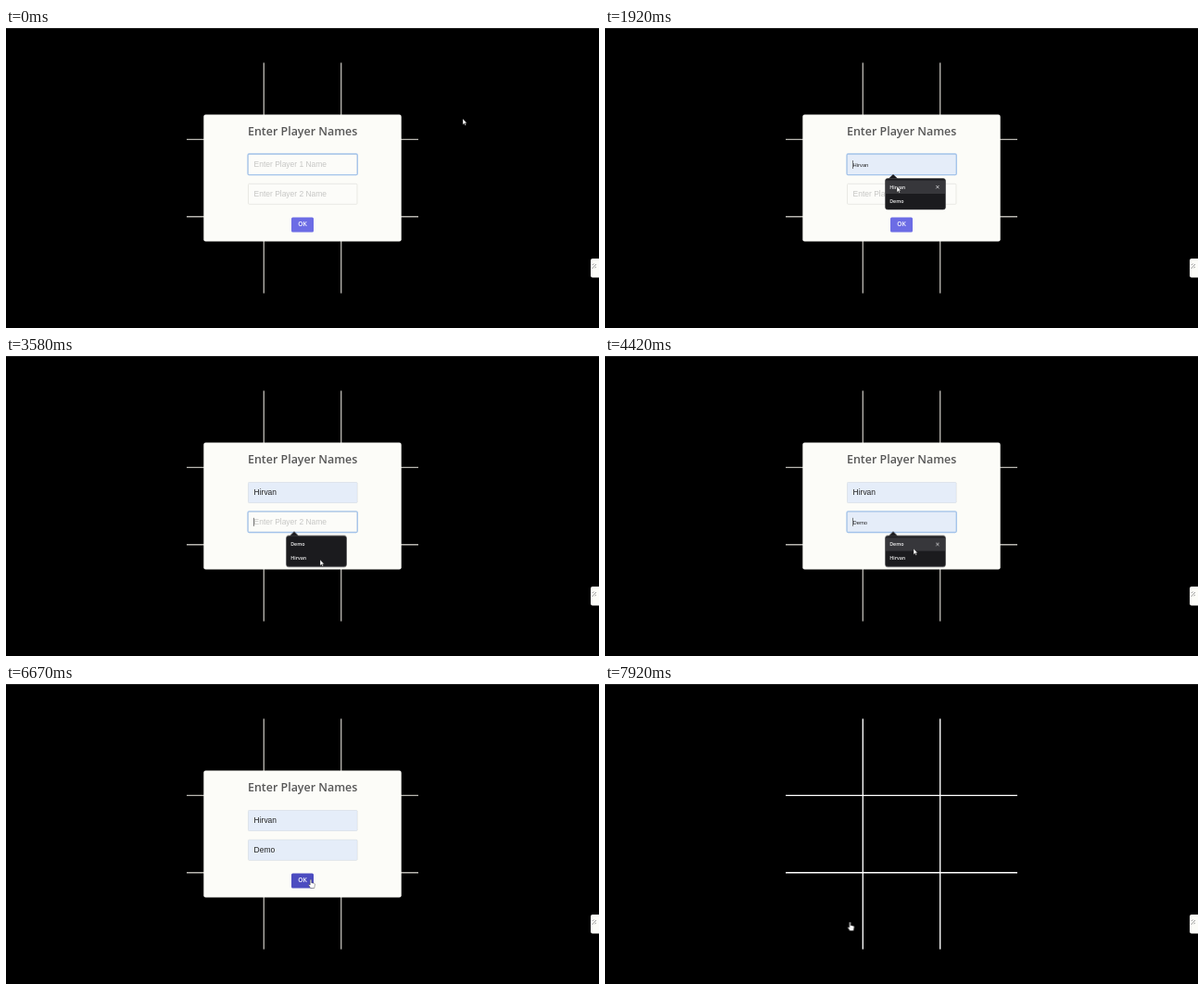
These frames come from a looping animation (640 by 324 pixels, 8000 ms). An HTML page:

```html
<!DOCTYPE html>
<html lang="en">
<head>
<meta charset="utf-8">
<title>Tic-tac-toe</title>
<style>
html, body { margin: 0; width: 100%; height: 100%; overflow: hidden; background: #000; }
svg { display: block; width: 100%; height: 100%; }
text { font-family: Arial, "Liberation Sans", sans-serif; font-size: 8.46px; fill: #222; }
.title { font: 600 12.45px "Open Sans", sans-serif; fill: #575757; text-anchor: middle; }
.ok { font: 600 6.7px "Open Sans", sans-serif; fill: #fff; text-anchor: middle; }
.option { font: 600 5.3px "Open Sans", sans-serif; fill: #f4f4f4; }
.preview { font-size: 5.8px; }
.hint { fill: #c6c6c4; }
.panel { fill: #fcfcf8; }
.field { fill: #fcfcf9; stroke: #e1e1dc; stroke-width: .7; }
.filled { fill: #e5edf9; stroke: #d5dce8; stroke-width: .5; }
.ring { fill: none; stroke: #a3c3ea; stroke-width: 1.3; }
.caret { stroke: #333; stroke-width: .7; }

/* Hard switches and fades share one 8 s clock. */
.cut { animation: 8s step-end infinite; }
.fade { animation: 8s linear infinite; }
.dialog { animation-name: dialog; }
.toast { animation-name: toast; }
.dim { animation-name: dim; }
.focus1 { animation-name: focus1; }
.focus2 { animation-name: focus2; }
.hint1 { animation-name: hint1; }
.hint2 { animation-name: hint2; }
.fill1 { animation-name: fill1; }
.fill2 { animation-name: fill2; }
.peek1 { animation-name: peek1; }
.peek2 { animation-name: peek2; }
.hover2 { animation-name: hover2; }
.value1 { animation-name: value1; }
.value2 { animation-name: value2; }
.caret1 { animation-name: caret1; }
.caret2 { animation-name: caret2; }
.menu1 { animation-name: menu1; }
.menu2 { animation-name: menu2; }
.press { animation-name: press; }
.arrow { animation-name: arrow; }
.beam { animation-name: beam; }
.hand { animation-name: hand; }
.pointer { animation: move 8s ease-in-out infinite; }

@keyframes dialog { 0%, 83.7% { opacity: 1 } 84.6%, 100% { opacity: 0 } }
@keyframes toast { 0%, 84.4% { opacity: 0 } 85.6%, 96% { opacity: 1 } 97.8%, 100% { opacity: 0 } }
@keyframes dim { 0%, 96% { stroke: #b8b6b0 } 97.8%, 100% { stroke: #fff } }
@keyframes focus1 { 0% { opacity: 1 } 36.25%, 100% { opacity: 0 } }
@keyframes focus2 { 0% { opacity: 0 } 36.25% { opacity: 1 } 72%, 100% { opacity: 0 } }
@keyframes hint1 { 0% { opacity: 1 } 22.4%, 100% { opacity: 0 } }
@keyframes hint2 { 0% { opacity: 1 } 53.75%, 100% { opacity: 0 } }
@keyframes fill1 { 0% { opacity: 0 } 22.4%, 100% { opacity: 1 } }
@keyframes fill2 { 0% { opacity: 0 } 53.75%, 100% { opacity: 1 } }
@keyframes peek1 { 0% { opacity: 0 } 22.4% { opacity: 1 } 27%, 100% { opacity: 0 } }
@keyframes peek2 { 0% { opacity: 0 } 53.75% { opacity: 1 } 62.5%, 100% { opacity: 0 } }
@keyframes hover2 { 0% { opacity: 0 } 53.75%, 100% { opacity: 1 } }
@keyframes value1 { 0% { opacity: 0 } 27%, 100% { opacity: 1 } }
@keyframes value2 { 0% { opacity: 0 } 62.5%, 100% { opacity: 1 } }
@keyframes caret1 { 0% { opacity: 0 } 16.25% { opacity: 1 } 27%, 100% { opacity: 0 } }
@keyframes caret2 {
  0% { opacity: 0 } 40.6% { opacity: 1 }
  62.5% { opacity: 1; transform: translateX(23.3px) } 72%, 100% { opacity: 0 }
}
@keyframes menu1 { 0%, 16.2% { opacity: 0 } 16.3%, 27% { opacity: 1 } 28.5%, 100% { opacity: 0 } }
@keyframes menu2 { 0%, 40.5% { opacity: 0 } 40.6%, 64% { opacity: 1 } 66%, 100% { opacity: 0 } }
@keyframes press { 0% { fill: #6c6ce5 } 78%, 100% { fill: #4c4cc0 } }
@keyframes arrow {
  0% { opacity: 1 } 13% { opacity: 0 } 20.5% { opacity: 1 } 31.5% { opacity: 0 }
  42% { opacity: 1 } 72% { opacity: 0 } 84.4% { opacity: 1 } 96.5%, 100% { opacity: 0 }
}
@keyframes beam {
  0% { opacity: 0 } 13% { opacity: 1 } 20.5% { opacity: 0 } 31.5% { opacity: 1 } 42%, 100% { opacity: 0 }
}
@keyframes hand { 0% { opacity: 0 } 72% { opacity: 1 } 84.4% { opacity: 0 } 96.5%, 100% { opacity: 1 } }
@keyframes move {
  0%, 4% { transform: translate(493px, 98px) }
  13.5%, 19% { transform: translate(320px, 149px) }
  22.4%, 28% { transform: translate(315px, 171px) }
  33%, 41% { transform: translate(340px, 181px) }
  44.5%, 49% { transform: translate(339px, 220px) }
  54.5%, 66% { transform: translate(333px, 208px) }
  73%, 87% { transform: translate(329px, 211px) }
  91.5%, 100% { transform: translate(264.5px, 257px) }
}
</style>
</head>
<body>
<svg viewBox="0 0 640 324" preserveAspectRatio="none">
  <defs>
    <g id="menu">
      <path d="M306 162.8 311 158 316 162.8Z" fill="#1b1b1e"/>
      <rect x="302.5" y="162.5" width="65" height="33.5" rx="2.5" fill="#1b1b1e" stroke="#3a3a3d" stroke-width=".5"/>
    </g>
    <g id="row">
      <rect x="303" y="164.5" width="64" height="14.5" fill="#37373b"/>
      <path d="M357.3 170l3.2 3.4m0-3.4l-3.2 3.4" stroke="#eee" stroke-width=".7"/>
    </g>
  </defs>

  <rect width="640" height="324"/>
  <path d="M0 .5H640" stroke="#222"/>
  <path class="fade dim" d="M278.3 37.5V286.5M361.7 37.5V286.5M195 120.3H445M195 203.7H445" stroke-width="1.35"/>
  <rect class="panel" x="631" y="249" width="12" height="20.5" rx="2"/>
  <path d="M632.5 260l4.5-5m-4 1l1.5-1.5m1 4.5l1.5-1" fill="none" stroke="#888" stroke-width=".8"/>

  <g class="fade dialog">
    <rect class="panel" x="213.3" y="93.5" width="213.4" height="137" rx="2.2"/>
    <text class="title" x="320.2" y="116.3">Enter Player Names</text>

    <rect class="field" x="261.5" y="136.5" width="117.5" height="22" rx="1"/>
    <rect class="cut fill1 filled" x="261.5" y="136.5" width="117.5" height="22" rx="1"/>
    <rect class="cut focus1 ring" x="261" y="136" width="118.3" height="22.7" rx="1.5"/>
    <text class="cut hint1 hint" x="267.6" y="150.4">Enter Player 1 Name</text>
    <text class="cut peek1 preview" x="267.6" y="149.9">Hirvan</text>
    <text class="cut value1" x="267.6" y="150.4">Hirvan</text>
    <path class="cut caret1 caret" d="M267.6 143V152"/>

    <rect class="field" x="261.5" y="168.3" width="117.5" height="22" rx="1"/>
    <rect class="cut fill2 filled" x="261.5" y="168.3" width="117.5" height="22" rx="1"/>
    <rect class="cut focus2 ring" x="261" y="167.8" width="118.3" height="22.7" rx="1.5"/>
    <text class="cut hint2 hint" x="267.6" y="182.2">Enter Player 2 Name</text>
    <text class="cut peek2 preview" x="267.6" y="181.7">Demo</text>
    <text class="cut value2" x="267.6" y="182.2">Demo</text>
    <path class="cut caret2 caret" d="M267.6 174.8V183.8"/>

    <rect class="cut press" x="308" y="204.5" width="24" height="16" rx="1.5"/>
    <text class="ok" x="320" y="214.4">OK</text>
  </g>

  <g class="fade menu1">
    <use href="#menu"/>
    <use class="cut peek1" href="#row"/>
    <text class="option" x="307.2" y="173.9">Hirvan</text>
    <text class="option" x="307.2" y="188.8">Demo</text>
  </g>
  <g class="fade menu2">
    <g transform="translate(0 31.6)">
      <use href="#menu"/>
      <use class="cut hover2" href="#row"/>
      <text class="option" x="307.2" y="173.9">Demo</text>
      <text class="option" x="307.2" y="188.8">Hirvan</text>
    </g>
  </g>

  <g class="fade toast">
    <rect class="panel" x="208.3" y="4" width="223.4" height="37" rx="2.2"/>
    <text class="title" x="320.2" y="27.9">Hirvan Takes the First Move!</text>
  </g>

  <g class="pointer">
    <path class="cut arrow" d="M0 0V6.4L1.5 5.1 2.5 7.3 3.5 6.8 2.5 4.7H4.4Z" fill="#fff" stroke="#222" stroke-width=".4"/>
    <path class="cut beam" d="M-1.3-3.5H1.3M0-3.5V3.5M-1.3 3.5H1.3" stroke="#444" stroke-width=".7"/>
    <path class="cut hand" d="M-.8 .6Q0-.5.7.6V3.7L3.6 4.3Q4.6 4.6 4.4 5.7L3.7 9.5H-.3L-2.5 6Q-2.4 4.8-.8 6Z" fill="#fff" stroke="#222" stroke-width=".4"/>
  </g>
</svg>
</body>
</html>
```
